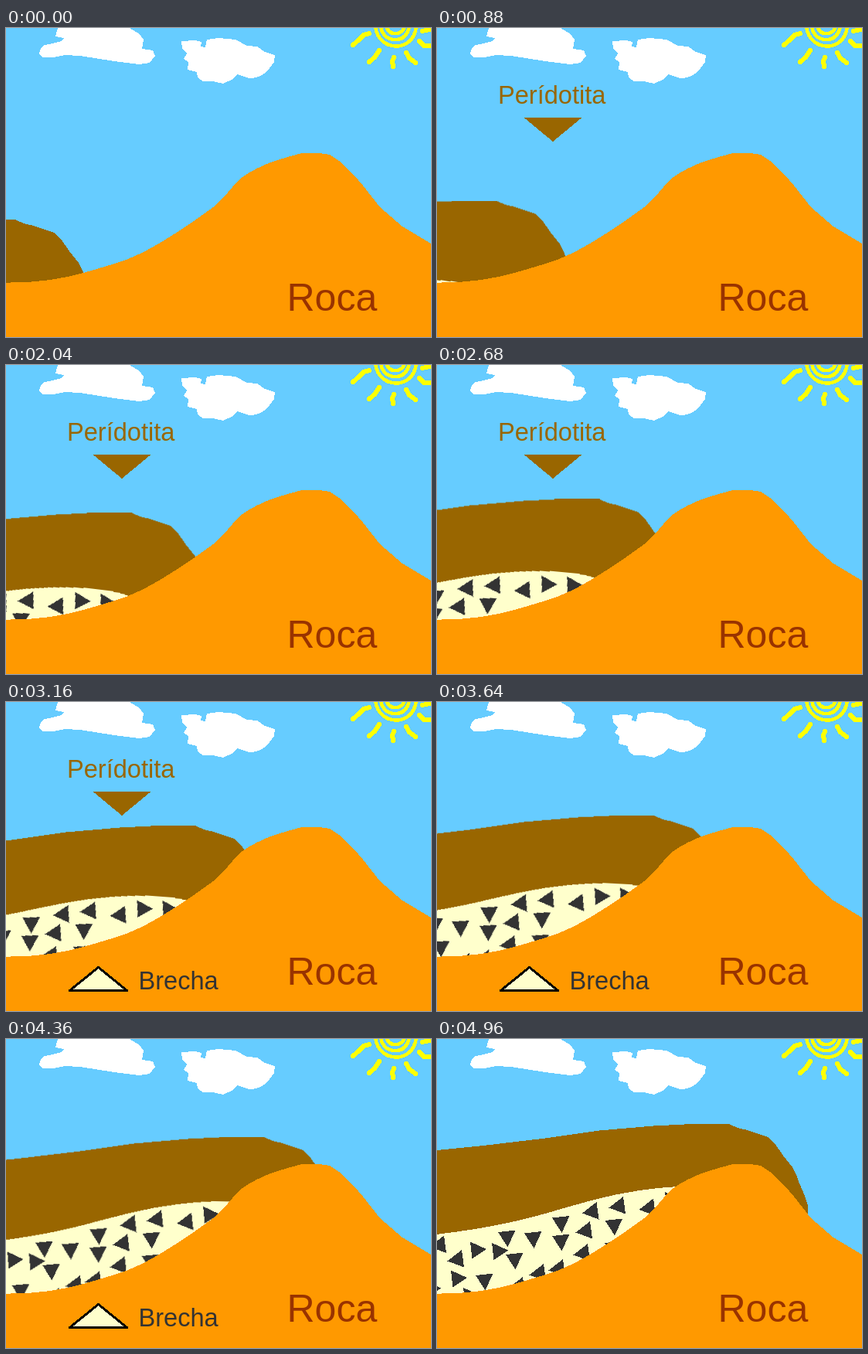
Animation of 550 by 400 pixels, one loop 7600 ms. Source, as an HTML page:

```html
<!DOCTYPE html>
<html lang="es">
<head>
<meta charset="utf-8">
<title>Brecha y roca</title>
<style>
  html, body { margin: 0; width: 100%; height: 100%; overflow: hidden; background: #6cf; }
  svg { display: block; width: 100%; height: 100%; shape-rendering: crispEdges; }
  text { font-family: "Liberation Sans", Arial, sans-serif; }

  .slab, .breccia, .label { animation: 7600ms infinite; }
  .slab { animation-name: slide; }
  .breccia { animation-name: swing; transform-origin: 236px 217px; }
  .top { animation-name: top; }
  .low { animation-name: low; }
  .label { animation-timing-function: step-end; }

  /* movement advances every 40 ms, then rests */
  @keyframes slide {
    0% { transform: translate(-366px, 138px); animation-timing-function: steps(124, end); }
    65.26%, 100% { transform: translate(0, 0); }
  }
  @keyframes swing {
    0% { transform: translate(-354px, 151.5px) rotate(11.8deg); animation-timing-function: steps(123, end); }
    64.73%, 100% { transform: translate(0, 0) rotate(0deg); }
  }
  @keyframes top {
    0%, 45.26% { opacity: 0; }
    5.26% { opacity: 1; }
    100% { opacity: 0; }
  }
  @keyframes low {
    0%, 64.73% { opacity: 0; }
    38.94% { opacity: 1; }
    100% { opacity: 0; }
  }
</style>
</head>
<body>
<svg viewBox="0 0 550 400">
  <defs>
    <path id="left" d="M0 0L-18.5 14.5L3 22.5Z"/>
    <path id="down" d="M0 0L22.5-2.5L12.5 19.5Z"/>
    <path id="right" d="M0 0L21 9.5L2.5 22Z"/>
  </defs>

  <rect width="550" height="400" fill="#6cf"/>

  <g fill="#fff">
    <path d="M67 0L64 11L75 13L72 17L60 20L50 22L45 26L43 33L47 38L62 38L76 35L96 36L140 43L172 47L186 45L193 36L190 29L176 27L178 15L173 8L160 0Z"/>
    <path d="M227 17L245 16L253 18L252 24L258 25L260 15L275 13L297 15L312 23L325 24L335 31L348 35L347 44L338 56Q328 65 315 65L299 60L292 67L281 72L268 69L255 69L248 64L247 57L235 54L236 44L230 40L234 33L228 27Z"/>
  </g>

  <g fill="none" stroke="#ff0" stroke-linecap="round" stroke-linejoin="round">
    <g stroke-width="4.5">
      <path d="M478-2C480 14 491 23.5 505 23.5S529 14 531-2"/>
      <path d="M485-2C487 10 495 15.5 505 15S520 8 522-2"/>
      <path d="M492-2C495 6 500 8 506 7S514 3 516-2"/>
    </g>
    <g stroke-width="6">
      <path d="M470 7L463 9L456 16L449 22"/>
      <path d="M483 29L477 38L470 44"/>
      <path d="M502 38L500 43L501 50"/>
      <path d="M518 32L522 39L530 45"/>
      <path d="M535 17L541 23L552 23"/>
      <path d="M539 4L552 1"/>
    </g>
  </g>

  <path class="slab" fill="#960" d="M-10 145L60 138L140 128.5L210 118.5L280 112.5L330 110L378 110L389 115L402 118L416 123L428 127L437 135L448 151L460 166L466 178L469 187L476 203L480 216L480 230L460 420L-10 420Z"/>

  <g class="breccia" fill="#333">
    <path fill="#ffc" d="M-20 255C40 249 95 239 140 226S220 202 262 196S338 189 362 194L385 204L400 420L-20 420Z"/>
    <use href="#right" x="328" y="196"/>
    <use href="#right" x="295" y="198"/>
    <use href="#left" x="280" y="206.5"/>
    <use href="#left" x="241" y="204"/>
    <use href="#left" x="206.5" y="211"/>
    <use href="#down" x="217.5" y="235"/>
    <use href="#left" x="198" y="236"/>
    <use href="#down" x="149" y="231.5"/>
    <use href="#down" x="149" y="255"/>
    <use href="#down" x="113" y="251.5"/>
    <use href="#down" x="79" y="250"/>
    <use href="#right" x="71" y="264"/>
    <use href="#right" x="43" y="262.5"/>
    <use href="#down" x="89" y="279"/>
    <use href="#left" x="195" y="265"/>
    <use href="#down" x="217" y="264"/>
    <use href="#left" x="163" y="285"/>
    <use href="#left" x="138" y="291"/>
    <use href="#left" x="111" y="308"/>
    <use href="#left" x="32" y="273"/>
    <use href="#left" x="9" y="254.5"/>
    <use href="#right" x="18" y="299.5"/>
    <use href="#down" x="50" y="306"/>
    <use href="#right" x="-16" y="313"/>
    <use href="#right" x="34" y="322"/>
  </g>

  <path fill="#f90" d="M0 329.5C40 330 72 325 102 316.5C130 308 152 303 175 291.5C202 278 240 253 270 230.5L287 213L300 198Q314 185 345 173L366 166.5L383 162Q402 160.5 419 164L431 172Q448 187 462 204L484 232L513 257L550 279V400H0Z"/>
  <text x="363.5" y="365.5" font-size="50" fill="#930">Roca</text>

  <g class="label top" fill="#960">
    <text x="79" y="98" font-size="32.6">Perídotita</text>
    <path d="M112.5 116H187.5L150 147Z"/>
  </g>

  <g class="label low">
    <path d="M82.5 373.5L119.5 343.5L156.5 373.5Z" fill="#ffc" stroke="#000" stroke-width="3" stroke-linejoin="round"/>
    <text x="171.5" y="372" font-size="32.6" fill="#333">Brecha</text>
  </g>
</svg>
</body>
</html>
```
